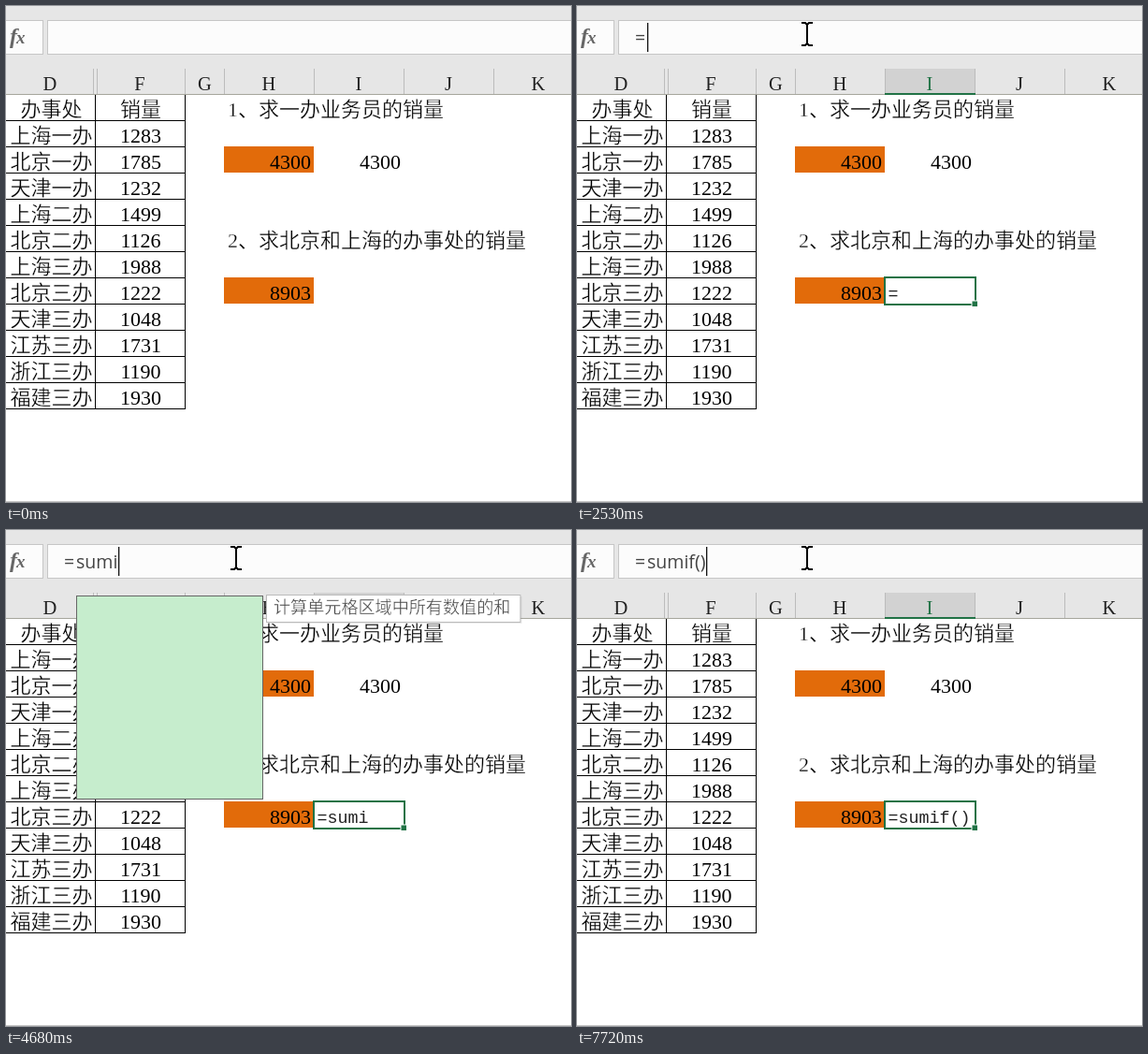
An HTML page for the animation above (8 s loop, 604 px wide and 530 px high).

```html
<!DOCTYPE html>
<html lang="zh-CN">
<head>
<meta charset="utf-8">
<title>SUMIF</title>
<style>
html, body { margin: 0; width: 100%; height: 100%; overflow: hidden; background: #fff; }
svg { display: block; width: 604px; height: 530px; }
text { white-space: pre; }
/* A hairline in the paper colour thins the CJK strokes. */
.cjk, .tip { stroke: #fff; stroke-width: .35px; }
.cjk { font: 300 22px "Liberation Serif", "Noto Sans CJK SC", "Noto Sans CJK", serif; }
.num { font: 22px "Liberation Serif", serif; }
.col { font: 20.5px "Liberation Serif", serif; fill: #222; }
.edit { font: 18.33px "Liberation Mono", monospace; fill: #222; }
.bar { font: 19.5px "Open Sans", sans-serif; fill: #444; }
.fx { font: italic bold 24px "Liberation Serif", serif; fill: #666; }
.item { font: 20.4px "Open Sans", sans-serif; }
.tip { font: 300 18.1px "Noto Sans CJK SC", "Noto Sans CJK", sans-serif; fill: #484848; }
.icon { font: italic 15px "Liberation Serif", serif; fill: #222; }
.mid { text-anchor: middle; }
.end { text-anchor: end; }
</style>
</head>
<body>
<svg viewBox="0 0 604 530">
  <defs>
    <linearGradient id="shade" x2="0" y2="1">
      <stop stop-color="#ddd"/><stop offset="1" stop-color="#fff"/>
    </linearGradient>
    <g id="cross">
      <path d="M-4-12H4V-4H12V4H4V12H-4V4H-12V-4H-4Z" fill="#000" transform="translate(1.5 1.5)"/>
      <path d="M-4-12H4V-4H12V4H4V12H-4V4H-12V-4H-4Z" fill="#fff" stroke="#000" stroke-width="1.5"/>
    </g>
    <path id="beam" d="M-6-12H-2L0-10L2-12H6M0-10V10M-6 12H-2L0 10L2 12H6" fill="none" stroke="#000" stroke-width="2"/>
  </defs>
  <g id="sheet"></g>
  <g id="selection">
    <rect x="330" y="67" width="95" height="27" fill="#d2d2d2"/>
    <text class="col mid" x="377" y="90" style="fill:#217346">I</text>
    <rect x="329" y="93" width="97" height="2" fill="#217346"/>
    <rect x="329" y="290" width="97" height="29" fill="#fff" stroke="#217346" stroke-width="2"/>
    <rect x="421.5" y="314.5" width="7" height="7" fill="#fff"/>
    <rect x="422.5" y="315.5" width="5.5" height="5.5" fill="#217346"/>
    <text class="edit" id="cell" x="332.5" y="313"></text>
  </g>
  <text class="bar" x="62" y="41" id="equals">=</text>
  <text class="bar" x="75" y="41" id="typed"></text>
  <rect id="caret" y="18" width="1.3" height="31" fill="#111"/>
  <g id="popup"></g>
  <use id="pointer"/>
</svg>
<script>
const $ = id => document.getElementById(id);
const LOOP = 8000;
const rect = (x, y, w, h, fill, more = "") =>
  `<rect x="${x}" y="${y}" width="${w}" height="${h}" fill="${fill}" ${more}/>`;
const text = (cls, x, y, s, more = "") =>
  `<text class="${cls}" x="${x}" y="${y}" ${more}>${s}</text>`;

function drawSheet() {
  let out = rect(0, 0, 604, 95, "#e6e6e6");
  out += rect(-1.5, 15.5, 41, 36, "#fcfcfc", 'stroke="#c6c6c6"');
  out += rect(44.5, 15.5, 570, 36, "#fcfcfc", 'stroke="#c6c6c6"');
  out += text("fx", 4, 40, 'f<tspan font-size="19" dx="-1">x</tspan>');
  for (const x of [93, 97, 191, 233, 329, 425, 521]) out += rect(x, 67, 1, 27, "#bcbcbc");
  out += rect(0, 94, 604, 1, "#a6a69c") + rect(0, 529, 604, 1, "#c6c6c6");
  [..."DFGHIJK"].forEach((c, i) => {
    out += text("col mid", [47, 143, 212.5][i] ?? 281 + 96 * (i - 3), 90, c);
  });

  const offices = "办事处 上海一办 北京一办 天津一办 上海二办 北京二办 上海三办 北京三办 天津三办 江苏三办 浙江三办 福建三办".split(" ");
  const sales = "销量 1283 1785 1232 1499 1126 1988 1222 1048 1731 1190 1930".split(" ");
  offices.forEach((name, i) => {
    const y = 118 + 28 * i;
    out += text("cjk mid", 48.5, y, name) + text((i ? "num" : "cjk") + " mid", 144, y, sales[i]);
    out += rect(0, y + 4, 192, 1, "#000");
  });
  for (const x of [95, 191]) out += rect(x, 95, 1, 336, "#000");

  out += text("cjk", 237, 118, "1、求一办业务员的销量");
  out += text("cjk", 237, 258, "2、求北京和上海的办事处的销量");
  out += rect(233, 150, 96, 28, "#e26b0a") + rect(233, 290, 96, 28, "#e26b0a");
  out += text("num end", 326, 174, "4300") + text("num end", 422, 174, "4300");
  out += text("num end", 326, 314, "8903");
  $("sheet").innerHTML = out;
}

// Each track holds [start ms, value...]; the latest started entry counts.
const barText = [[0, ""], [2530, "="], [4070, "=s"], [4310, "=su"], [4450, "=sum"],
  [4680, "=sumi"], [5230, "=sumif"], [7380, "=sumif("], [7670, "=sumif()"]];
const cellText = [[0, ""], [2530, "="], [4070, "=s"], [4310, "=su"], [4450, "=sum"],
  [4680, "=sumi"], [5310, "=sumif"], [7470, "=sumif("], [7720, "=sumif()"]];
const caretX = [60, 75, 84, 96, 114, 120, 126, 132, 138];
const caretOn = [[0, 0], [1540, 1], [2250, 0], [2530, 1], [3040, 0], [3520, 1],
  [5840, 0], [6300, 1], [6930, 0], [7380, 1]];

const names = {
  s: "SEARCH SEARCHB SEC SECH SECOND SERIESSUM SHEET SHEETS SIGN SIN SINH SKEW",
  su: "SUBSTITUTE SUBTOTAL SUM SUMIF SUMIFS SUMPRODUCT SUMSQ SUMX2MY2 SUMX2PY2 SUMXMY2",
  sum: "SUM SUMIF SUMIFS SUMPRODUCT SUMSQ SUMX2MY2 SUMX2PY2 SUMXMY2",
  sumif: "SUMIF SUMIFS"
};
const tips = {
  s: "返回一个指定字符或文本字符串在字符串中第一次出现的位置",
  su: "将字符串中的部分字符串以新字符串替换",
  sum: "计算单元格区域中所有数值的和",
  sumif: "对满足条件的单元格求和"
};
// Popup entry: list key, tip key, whether the rows are painted yet.
const popups = [[0], [4070, "shade"], [4160, "s", "", 0], [4230, "s", "s", 1],
  [4310, "su", "s", 0], [4370, "su", "su", 1], [4450, "sum", "su", 0],
  [4560, "sum", "sum", 1], [4680, "sum", "sum", 0], [4770, "sumif", "sumif", 1],
  [5310, "sumif", "sumif", 0], [5390, "sumif", "sumif", 1], [7670]];

const pointers = [[0], [70, "cross", 476, 483], [150, "cross", 470, 462], [230, "cross", 456, 424],
  [310, "cross", 438, 382], [390, "cross", 420, 346], [470, "cross", 406, 322],
  [550, "cross", 396, 307], [1010, "cross", 380, 268], [1090, "cross", 334, 186],
  [1170, "cross", 282, 112], [1240, "beam", 254, 46], [1310, "beam", 248, 36.5],
  [1390, "beam", 240, 32], [1540, "beam", 237, 29], [1860, "beam", 246, 30]];

const at = (track, t) => track.findLast(entry => entry[0] <= t);

function drawPopup([, key, tip, painted]) {
  if (!key) return "";
  if (key === "shade") return rect(206, 95, 220, 5, "url(#shade)");
  const rows = names[key].split(" ");
  const width = key === "sumif" ? 128 : 199;
  let out = rect(75.5, 70.5, width, rows.length * 27 + 1, "#c6edcd", 'stroke="#666"');
  if (painted) {
    out += rect(105, 71, width - 30, 27, "#3399ff");
    rows.forEach((name, i) => {
      const y = 84 + 27 * i;
      out += `<circle cx="92" cy="${y}" r="10.5" fill="#fff" stroke="#555"/>`;
      out += text("icon mid", 91.5, y + 4, "fx");
      out += text("item", 106, y + 7.5, name, `fill="${i ? "#111" : "#fff"}"`);
    });
  }
  if (tip) {
    const x = tip === "sumif" ? 207 : 278;
    const w = tips[tip].length * 18.1 + 18;
    out += rect(x + 2, 71, w, 29, "#000", 'opacity=".08"');
    out += rect(x + .5, 69.5, w, 29, "#fff", 'stroke="#bbb"');
    out += text("tip", x + 8, 88.5, tips[tip]);
  }
  return out;
}

let shown;
function render(t) {
  const bar = at(barText, t)[1];
  $("selection").style.display = t >= 630 ? "" : "none";
  $("cell").textContent = at(cellText, t)[1];
  $("equals").style.display = bar ? "" : "none";
  $("typed").textContent = bar.slice(1);
  $("caret").setAttribute("x", caretX[bar.length]);
  $("caret").style.display = at(caretOn, t)[1] ? "" : "none";

  const popup = at(popups, t);
  if (popup !== shown) $("popup").innerHTML = drawPopup(shown = popup);

  const [, kind, x, y] = at(pointers, t);
  $("pointer").style.display = kind ? "" : "none";
  if (kind) {
    $("pointer").setAttribute("href", "#" + kind);
    $("pointer").setAttribute("transform", `translate(${x} ${y})`);
  }
}

drawSheet();
const start = performance.now();
function tick() {
  render((performance.now() - start) % LOOP);
  requestAnimationFrame(tick);
}
tick();
</script>
</body>
</html>
```
